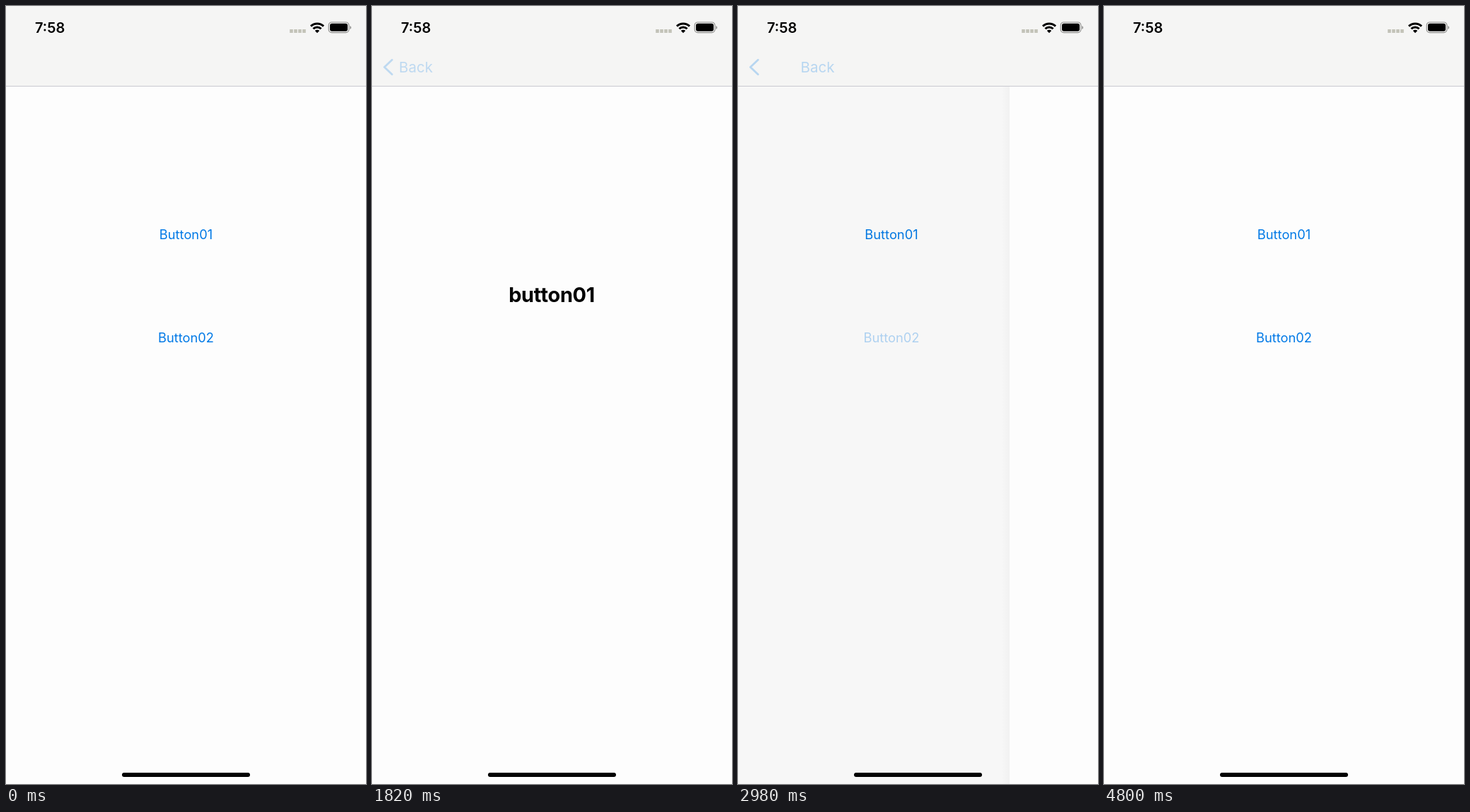
Animation, 509 px wide and 1101 px high, one loop 4830 ms. Source, as an HTML page:

```html
<!DOCTYPE html>
<html lang="en">
<head>
<meta charset="utf-8">
<title>Navigation push and pop</title>
<style>
  html, body { margin: 0; width: 100%; height: 100%; overflow: hidden; background: #fdfdfd; }
  svg { display: block; width: 509px; height: 1101px; }
  text { font-family: Inter, Roboto, sans-serif; font-optical-sizing: none; }
  .link { fill: #0079e6; }
  .button { font-size: 18.3px; text-anchor: middle; }
  #label { font-size: 29px; font-weight: 700; letter-spacing: -.4px; text-anchor: middle; }
  #backText { font-size: 20.5px; }
  .time { font-size: 20px; font-weight: 600; }
</style>
</head>
<body>
<svg viewBox="0 0 509 1101">
  <defs>
    <linearGradient id="edge">
      <stop offset="0" stop-color="#000" stop-opacity="0"/>
      <stop offset="1" stop-color="#000" stop-opacity=".025"/>
    </linearGradient>
  </defs>

  <g id="home">
    <rect width="680" height="1101" fill="#fdfdfd"/>
    <text id="button1" class="link button" x="254.5" y="330">Button01</text>
    <text id="button2" class="link button" x="254.5" y="476">Button02</text>
  </g>
  <rect id="dim" width="509" height="1101"/>

  <g id="page">
    <rect id="shadow" x="-12" width="12" height="1101" fill="url(#edge)"/>
    <rect width="509" height="1101" fill="#fdfdfd"/>
    <text id="label" x="254" y="419"></text>
  </g>

  <rect width="509" height="113" fill="#f5f5f4"/>
  <rect y="113" width="509" height="1" fill="#c9c9d0"/>
  <g id="back">
    <path d="M28.3 76.3 17.5 86.5 28.3 96.7" fill="none" stroke="#0079e6" stroke-width="2.8"
      stroke-linecap="round" stroke-linejoin="round"/>
    <text id="backText" class="link" y="94">Back</text>
  </g>

  <text class="time" x="41" y="38">7:58</text>
  <path d="M403.5 33v5m6-5v5m6-5v5m6-5v5" stroke="#c3c3b8" stroke-width="4.6"/>
  <g fill="none" stroke="#000" stroke-width="3">
    <path d="M431 28.6a13 13 0 0 1 18 0"/>
    <path d="M434.4 32.2a8 8 0 0 1 11.2 0"/>
  </g>
  <path d="M440 38.2l-3.2-3.2a4.6 4.6 0 0 1 6.4 0z"/>
  <rect x="456.2" y="23" width="28.6" height="14.6" rx="4.4" fill="none" stroke="#8e8e8c" stroke-width="1.2"/>
  <rect x="458" y="24.8" width="25" height="11" rx="2.8"/>
  <path d="M486.4 28v5a2.7 2.7 0 0 0 0-5z" fill="#8e8e8c"/>
  <rect x="164" y="1085" width="181" height="6" rx="3"/>
</svg>

<script>
const LOOP = 4830, WIDTH = 509;
const visits = [
  { label: "button01", down: 350, up: 490, push: 538, backDown: 1820, pop: 1952 },
  { label: "viewcontroller", down: 2770, up: 2880, push: 2929, backDown: 3930, pop: 4275 }
];
const el = id => document.getElementById(id);
const [home, dim, page, shadow, label, back, backText] =
  ["home", "dim", "page", "shadow", "label", "back", "backText"].map(el);
const buttons = [el("button1"), el("button2")];

// Critically damped spring, mass 3 and stiffness 1000, cut off after half a second
function spring(ms) {
  if (ms <= 0) return 0;
  if (ms >= 500) return 1;
  const x = Math.sqrt(1000 / 3) * ms / 1000;
  return 1 - (1 + x) * Math.exp(-x);
}

function buttonAlpha(t, { down, up }) {
  if (t < down) return 1;
  const k = Math.min(1, Math.max(0, (t - up) / 470));
  return .2 + .8 * k * k * (3 - 2 * k);
}

function draw(now) {
  const t = now % LOOP;
  const visit = visits[t < 2600 ? 0 : 1];
  const closing = spring(t - visit.pop);
  const open = spring(t - visit.push) * (1 - closing);

  home.setAttribute("transform", `translate(${-.3 * WIDTH * open})`);
  dim.setAttribute("opacity", .1 * open);
  page.setAttribute("transform", `translate(${WIDTH * (1 - open)})`);
  page.setAttribute("visibility", open ? "visible" : "hidden");
  shadow.setAttribute("opacity", open < 1 ? 1 : 0);
  label.textContent = visit.label;
  buttons.forEach((b, i) => b.setAttribute("opacity", buttonAlpha(t, visits[i])));

  const slide = t < visit.pop ? 1 - open : closing ** 1.3;
  backText.setAttribute("x", 38 + 67 * slide);
  back.setAttribute("opacity", t < visit.backDown ? open : Math.min(.22, open));
}

const start = performance.now();
(function tick() {
  draw(performance.now() - start);
  requestAnimationFrame(tick);
})();
</script>
</body>
</html>
```
